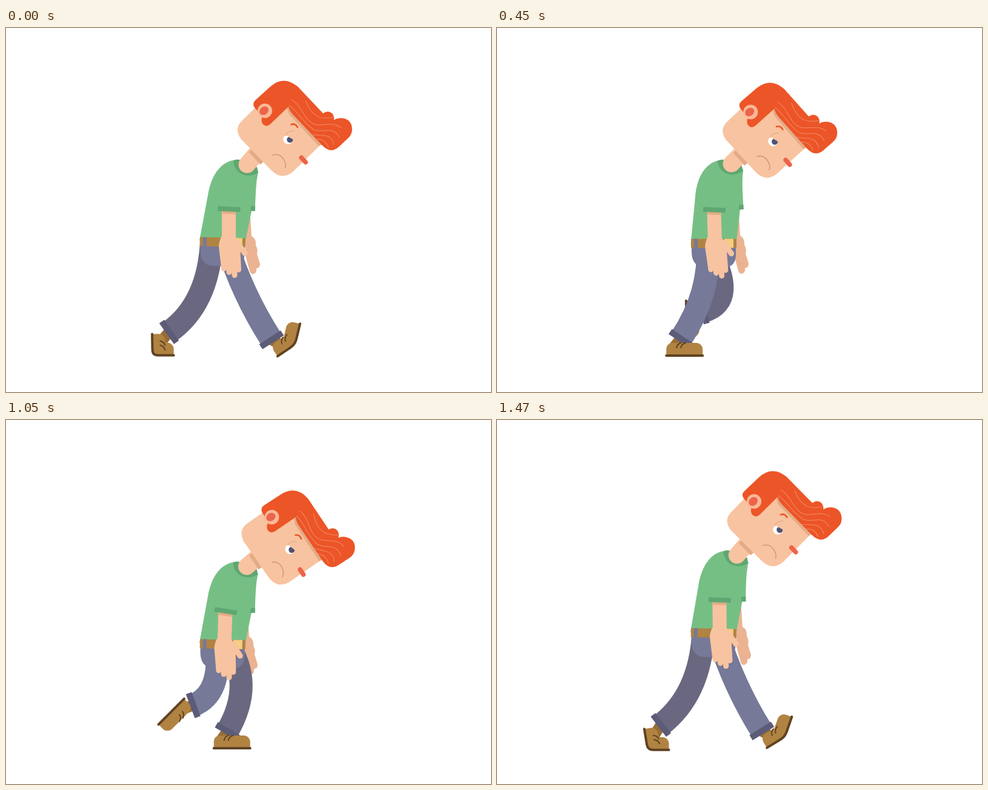
Recreate the animation shown at these times as an HTML page with a canvas. Size 800 by 600 pixels, loop 1.5 s.

```html
<!DOCTYPE html>
<html>
<head>
<meta charset="utf-8">
<style>
html, body { margin: 0; width: 100%; height: 100%; overflow: hidden; background: #fff; }
canvas { display: block; }
</style>
</head>
<body>
<canvas id="stage" width="800" height="600"></canvas>
<script>
const ctx = document.getElementById('stage').getContext('2d');
const LOOP = 1500, STEP = LOOP / 2, TAU = 2 * Math.PI, DEG = Math.PI / 180;
const C = {
  skin: '#f8c3a0', farSkin: '#ebb392', shade: '#e3ab86', hair: '#ec5527', strand: '#f28b68',
  red: '#ec644a', shirt: '#76bf84', trim: '#5fa772', jeans: '#767998', farJeans: '#6a6880',
  cuff: '#5c5c78', shoe: '#b08342', ankle: '#976d35', sole: '#604222', buckle: '#f5cd84'
};

// Key poses of one leg: time, knee x, knee y, ankle x, ankle y, foot roll, ankle along foot
const stride = [
  [0, 389, 438, 438, 514, -34, -28],     // heel strike
  [60, 404, 438, 430, 513, 0, -25],      // foot flat
  [240, 416, 434, 382, 513, 0, -9],      // weight
  [450, 358, 437, 308, 512, 0, -6],      // passing
  [750, 334, 455, 269, 501, 89, -38],    // push off
  [900, 345, 469, 281, 486, 119, -30],   // lift
  [1050, 352, 452, 304, 470, 135, -33],  // trail
  [1200, 405, 450, 345, 467, 89, -12]    // swing
];

// Sum of harmonics around a mean; each term is [amplitude, time of its peak].
const wave = (time, period, mean, ...terms) =>
  terms.reduce((sum, [amp, peak], k) => sum + amp * Math.cos((k + 1) * TAU * (time - peak) / period), mean);

// Periodic monotone cubic through all columns of the key poses.
function pose(keys, time) {
  const n = keys.length;
  let i = n - 1;
  while (keys[i][0] > time) i--;
  const row = k => keys[(k + n) % n];
  const when = k => row(k)[0] + LOOP * Math.floor(k / n);
  const slope = (k, c) => (row(k + 1)[c] - row(k)[c]) / (when(k + 1) - when(k));
  const tangent = (k, c) => {
    const a = slope(k - 1, c), b = slope(k, c);
    return a * b > 0 ? 2 * a * b / (a + b) : 0;
  };
  const span = when(i + 1) - when(i), u = (time - when(i)) / span, v = 1 - u;
  return row(i).map((value, c) => v * v * (1 + 2 * u) * value + u * u * (3 - 2 * u) * row(i + 1)[c]
    + span * u * v * (v * tangent(i, c) - u * tangent(i + 1, c)));
}

function turned(x, y, a) {
  return [x * Math.cos(a) - y * Math.sin(a), x * Math.sin(a) + y * Math.cos(a)];
}

function fill(color, path) {
  ctx.fillStyle = color;
  ctx.fill(typeof path === 'string' ? new Path2D(path) : path);
}

function line(color, width, path, cap = 'round') {
  ctx.strokeStyle = color;
  ctx.lineWidth = width;
  ctx.lineCap = cap;
  ctx.stroke(typeof path === 'string' ? new Path2D(path) : path);
}

function segment(color, radius, x, y, from, to) {
  const path = new Path2D();
  path.arc(x, y, radius, from, to);
  fill(color, path);
}

// Draws in a frame moved to x, y and turned; ox, oy is the pivot in local units.
function placed(x, y, angle, draw, ox = 0, oy = 0) {
  ctx.save();
  ctx.translate(x, y);
  ctx.rotate(angle * DEG);
  ctx.translate(-ox, -oy);
  draw();
  ctx.restore();
}

function foot(bend) {
  const b = bend * DEG, k = Math.min(1, Math.abs(bend) / 40);
  const len = 30 + 5 * k, r = 1 + 8 * k, joint = 21 * Math.tan(b / 2);
  const sole = new Path2D();
  sole.moveTo(-len, 0);
  sole.lineTo(-r, 0);
  sole.quadraticCurveTo(0, 0, ...turned(r, 0, b));
  sole.lineTo(...turned(len, 0, b));
  const upper = new Path2D(sole);
  upper.arcTo(...turned(len, -21, b), joint, -21, 11);
  upper.lineTo(joint, -21);
  upper.arcTo(-len, -21, -len, 0, 10);
  upper.closePath();
  fill(C.shoe, upper);
  line(C.sole, 4, sole);
  ctx.translate(joint / 2, 0);
  line(C.sole, 2, 'M-13-13Q-12-19-6-21M-6-13Q-5-19 2-21');
}

// Toes stay down while the heel lifts, and curl up before the heel lands.
function toeBend(phase, roll) {
  if (phase > 900 || roll < 0) return Math.min(0, 1.25 * roll);
  return -Math.min(roll, 4.2 * Math.max(0, 112 - roll));
}

function leg(phase, belt, color) {
  const [, kx, ky, ax, ay, roll, along] = pose(stride, phase);
  const hx = wave(phase, LOOP, 351, [13, 100]);
  const depth = 28 - Math.max(0, roll - 115) / 2;
  const [dx, dy] = turned(along, -depth, roll * DEG);
  const [ex, ey] = turned(-19, -12, roll * DEG);
  const bx = ax - dx, by = ay - dy;
  line(C.ankle, 18, `M${ax},${ay}L${bx + ex},${by + ey}`, 'butt');
  line(color, 38, `M${hx},${belt + 6}Q${kx},${ky} ${ax},${ay}`, 'butt');
  placed(ax, ay, Math.atan2(ay - ky, ax - kx) / DEG, () => fill(C.cuff, 'M-5-21H5V21H-5Z'));
  placed(bx, by, roll, () => foot(toeBend(phase, roll)));
}

function farArm() {
  fill(C.farSkin, `M388,290L402,295L405,343Q413,347 412,358Q416,365 414,372
    L419,389Q419,396 413,396Q414,403 409,405Q405,407 402,401L395,375L394,345Z`);
}

function hips() {
  fill(C.jeans, 'M-36,13H37V28Q36,47 17,47H-16Q-36,45-36,20Z');
  fill(C.shoe, 'M-37,0H38V15H-37Z');
  fill(C.jeans, 'M-32,0H-26V15H-32Z');
  fill(C.buckle, 'M18,0H33V15H18Z');
}

function torso() {
  fill(C.shirt, `M319,350L333,275C338,245 352,220 378,217L416,237C412,255 412,270 411,293V301
    H405L395,350Z`);
  fill(C.trim, 'M404,293H411V301H403Z');
  fill(C.trim, 'M375,218C376,240 398,249 416,238L414,229L386,217Q380,215 375,218Z');
}

function nearArm(x, y, sleeve, angle) {
  placed(x, y, angle, () => {
    fill(C.skin, 'M-12,0L-12,44Q-17,53-17,62L-13,97L16,99L19,62L11,46V0Z');
    line(C.skin, 9, 'M-8,70L-8.5,98M-1,70L0,104M8,70L9,109M14,70L15.5,100M13,54L26,73');
  });
  placed(x, y, sleeve, () => {
    fill(C.shade, 'M-11,3H11V8H-11Z');
    fill(C.trim, 'M-18.5-4H18.5V4H-18.5Z');
  });
}

function head() {
  line(C.shade, 11, 'M404.5,201.5L424,222', 'butt');
  fill(C.skin, 'M412,131L388,155Q376,168 388,184L438,235Q455,252 473,238L520,192L470,125Z');
  fill(C.shade, 'M464,130Q463,139 471,147L516,195L522,192L470,128Z');
  fill(C.hair, `M410,132Q405,125 412,119L436,97Q458,78 481,97L523,141Q531,135 538,141
    Q542,146 541,152C548,146 571,146 571,167Q571,176 564,182L549,196Q536,208 522,194
    L476,146Q467,137 466,130L436,159Q429,165 423,158Q420,152 423,146Z`);
  line(C.strand, 1, `M471,119C490,128 492,160 516,160C530,160 540,155 552,164
    M467,128C484,140 488,155 508,168C525,174 538,160 550,180
    M494,120C505,148 520,152 541,147M505,176C520,178 537,173 541,192
    M512,184Q526,182 532,197`);
  segment('#f9b897', 12, 427, 137, 0, TAU);
  placed(425.5, 137, -40, () => fill(C.red, 'M-8,0a8,6.5 0 1 1 16,0a8,6.5 0 1 1-16,0'));
  segment('#fff', 8, 465.5, 184, 0, 4.2);
  segment('#4d5273', 5, 468.5, 184.5, -0.12, 4.3);
  line(C.shade, 1.2, 'M461,178Q463,170 474,170');
  line(C.hair, 2.6, 'M470.5,159.5Q477,157 481,164');
  line('#d39a78', 1.6, 'M440,210Q452,206 459,218Q463,225 461,231');
  line(C.red, 7.5, 'M487.5,214L494.5,221.5');
}

function draw(time) {
  const bob = (...shape) => wave(time, STEP, ...shape);
  const belt = bob(349.7, [11.3, 250], [2.2, 325]);
  const lean = bob(-2, [9.5, 135], [2, 200]) / 127;
  const earX = bob(428.5, [15.3, 185], [3, 210]);
  const earY = bob(144, [16, 240], [2.5, 262]);
  const tilt = bob(3.9, [6.5, 240], [1, 215]);
  const drift = wave(time, LOOP, 0, [5, 1125]);
  const reach = wave(time, LOOP, -3, [3, 0]);
  const onTorso = (x, y) => {
    const [dx, dy] = turned(x - 357, y - 345, lean);
    return [357 + dx, belt + dy];
  };
  const [neckX, neckY] = onTorso(397.5, 224.5);
  const [armX, armY] = onTorso(367, 298);
  const [jawX, jawY] = turned(-8, 65, tilt * DEG);

  ctx.clearRect(0, 0, 800, 600);
  placed(reach, belt - 345.5 + reach * 0.6, 0, farArm);
  placed(drift, 0, 0, () => {
    leg((time + STEP) % LOOP, belt, C.farJeans);
    leg(time, belt, C.jeans);
  });
  placed(357, belt, lean / DEG, torso, 357, 345);
  placed(357, belt, 1.4 + 15 * lean, hips);
  line(C.skin, 28, `M${neckX},${neckY}L${earX + jawX},${earY + jawY}`);
  placed(earX, earY, tilt, head, 426, 137);
  nearArm(armX + bob(-2, [3, 0]), armY, bob(4.5, [5.5, 220]), bob(0, [3, STEP / 4]));
}

const start = performance.now();
function tick() {
  const time = (performance.now() - start) % LOOP;
  draw(Math.floor(time / 30) * 30);
  requestAnimationFrame(tick);
}
tick();
</script>
</body>
</html>
```
